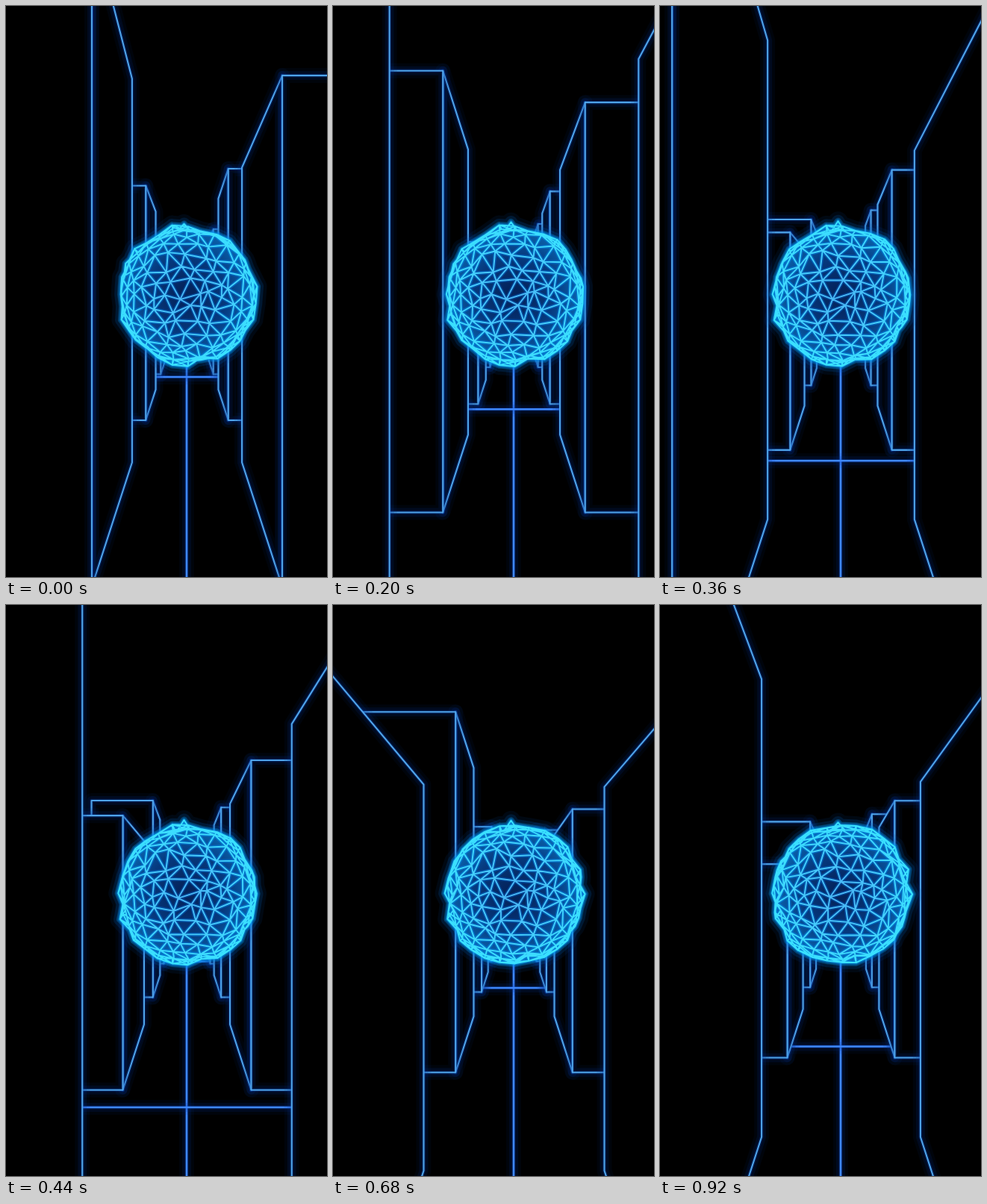
These frames come from a looping animation (430 px wide and 765 px high, 0.96 s). An HTML page with a canvas:

```html
<!DOCTYPE html>
<html>
<head>
<meta charset="utf-8">
<style>
html, body { margin: 0; width: 430px; height: 765px; overflow: hidden; background: #000; }
canvas { display: block; }
</style>
</head>
<body>
<canvas id="stage" width="430" height="765"></canvas>
<script>
const ctx = document.getElementById('stage').getContext('2d');
const LOOP = 960, STEP = 40;
const VX = 242.5, VY = 384.5;            // vanishing point
const GROUND = 3.085, OUTER = 2.8;       // in half street widths
const SPEED = 0.03798, NEAR = 0.8;
const BLOCK = 10.25, DEPTH = 5.75, FIRST = 7.84;
const LINE_GAP = 22.45, FIRST_LINE = 27.4;

// Towers rise and sink on one wave: [mean height, time of peak in s].
// A tower without a peak stands still.
const PERIOD = 1.1;
const left = { swing: 0.5, towers: [[3.9], [2.97, 0.42], [1.19], [2.58, 0.68], [0.52], [2.6, 0.52]] };
const right = { swing: 0.85, towers: [[1.44, 0.02], [2.18, 0.035], [1.98, 0.18], [2.06, 0.255], [1.7, 0.095], [2, 0.76]] };

function height({ swing, towers }, k, t) {
  const [mean, peak] = towers[k];
  if (peak === undefined) return mean;
  return mean + swing * Math.cos(2 * Math.PI * (t / 1000 - peak) / PERIOD);
}

const project = (x, y, d) => [VX + x * 1000 / d, VY + y * 1000 / d];

function trace(points, close) {
  ctx.beginPath();
  points.forEach(p => ctx.lineTo(p[0], p[1]));
  if (close) ctx.closePath();
}

function strokes(layers) {
  for (const [width, color] of layers) {
    ctx.lineWidth = width;
    ctx.strokeStyle = color;
    ctx.stroke();
  }
}

function neon(color = '#4fa4ea', width = 2.1) {
  strokes([[20, 'rgba(0,40,110,.1)'], [12, 'rgba(0,50,150,.15)'],
           [5, 'rgba(0,70,200,.25)'], [width, color]]);
}

function panel(points) {
  trace(points, true);
  ctx.fillStyle = '#000';
  ctx.fill();
  neon();
}

function building(side, inner, outer, h, front) {
  const back = front + DEPTH;
  if (back < NEAR) return;
  const near = Math.max(front, NEAR), a = side * inner, b = side * outer;
  panel([project(a, -h, near), project(a, -h, back), project(a, GROUND, back), project(a, GROUND, near)]);
  if (front > NEAR)
    panel([project(a, -h, front), project(b, -h, front), project(b, GROUND, front), project(a, GROUND, front)]);
}

function street(t) {
  trace([[VX - 0.5, VY], [VX - 0.5, 780]]);
  neon('#3f88ff', 2.6);
  const items = [];
  for (let i = 0; i < 3; i++) {
    const d = FIRST_LINE + i * LINE_GAP - SPEED * t;
    if (d > NEAR) items.push([d, () => {
      trace([project(-OUTER, GROUND, d), project(OUTER, GROUND, d)]);
      neon('#3f88ff', 2.5);
    }]);
  }
  left.towers.forEach((_, k) => {
    const front = FIRST + BLOCK * k - SPEED * t;
    items.push([front, () => {
      if (k === 2) building(-1, 2.9, 4.7, 1.93, front);   // a second row behind the low tower
      building(-1, 1, OUTER, height(left, k, t), front);
      building(1, 1, OUTER, height(right, k, t), front);
    }]);
  });
  items.sort((a, b) => b[0] - a[0]).forEach(item => item[1]());
}

// Icosahedron with every face split into a 5-step triangle grid.
const SPLIT = 5;
function makeBall() {
  const g = (1 + Math.sqrt(5)) / 2, v = [], tris = [];
  for (const a of [-1, 1]) for (const b of [-g, g]) v.push([a, b, 0], [0, a, b], [b, 0, a]);
  const touch = (i, j) => Math.hypot(...v[i].map((c, n) => c - v[j][n])) < 2.1;
  const point = (p, q, r, i, j) => {
    const w = p.map((c, n) => c * (SPLIT - i - j) + q[n] * i + r[n] * j);
    const len = Math.hypot(...w), [x, y, z] = w.map(c => c / len);
    return [y, x, z];                    // lays the facing edge horizontal
  };
  for (let a = 0; a < 12; a++) for (let b = a + 1; b < 12; b++) for (let c = b + 1; c < 12; c++) {
    if (!touch(a, b) || !touch(b, c) || !touch(a, c)) continue;
    const at = (i, j) => point(v[a], v[b], v[c], i, j);
    for (let i = 0; i < SPLIT; i++) for (let j = 0; i + j < SPLIT; j++) {
      tris.push([at(i, j), at(i + 1, j), at(i, j + 1)]);
      if (i + j < SPLIT - 1) tris.push([at(i + 1, j), at(i + 1, j + 1), at(i, j + 1)]);
    }
  }
  return tris;
}
const ball = makeBall().filter(([a, b, c]) => a[2] + b[2] + c[2] > -0.5);

// Pushes a vertex in or out and a little sideways, drifting slowly.
function bump([x, y, z], t) {
  const w = t * 0.002;
  const r = 91 * (1 + 0.035 * Math.sin(37 * x + 29 * y - 23 * z + w)
    + 0.025 * Math.sin(13 * y - 11 * x + 9 * z - w));
  const sx = 0.065 * Math.sin(41 * y + 37 * z + 19 * x + w * 0.5);
  const sy = 0.065 * Math.sin(43 * x - 31 * z + 17 * y - w * 0.5);
  return [VX + 0.5 + r * (x + sx * z), 387.5 + r * (y + sy * z)];
}

function radial(...stops) {
  const grad = ctx.createRadialGradient(VX, 387, 10, VX, 387, 96);
  stops.forEach((c, i) => grad.addColorStop(i / (stops.length - 1), c));
  return grad;
}

function sphere(t) {
  ctx.beginPath();
  for (const tri of ball) {
    const [a, b, c] = tri.map(p => bump(p, t));
    // same winding everywhere, so overlaps stay filled
    const flip = (b[0] - a[0]) * (c[1] - a[1]) < (b[1] - a[1]) * (c[0] - a[0]);
    for (const [i, p] of (flip ? [a, c, b] : [a, b, c]).entries())
      ctx[i ? 'lineTo' : 'moveTo'](p[0], p[1]);
    ctx.closePath();
  }
  // spike at the top
  ctx.moveTo(230, 301);
  ctx.lineTo(238.5, 292 - 4 * Math.sin(Math.PI * t / LOOP));
  ctx.lineTo(247, 301);
  ctx.closePath();

  strokes([[26, 'rgba(0,70,150,.12)'], [17, 'rgba(0,100,200,.18)'], [9, 'rgba(0,150,240,.35)']]);
  ctx.fillStyle = radial('#04245c', '#06397e', '#0b6cb8');
  ctx.fill();
  strokes([[5, radial('rgba(0,110,230,.35)', 'rgba(0,150,245,.5)')],
           [1.9, radial('#48b8f6', '#46cbfc', '#38e2ff')]]);
}

function draw(now) {
  const t = Math.floor((now % LOOP) / STEP) * STEP;
  ctx.fillStyle = '#000';
  ctx.fillRect(0, 0, 430, 765);
  ctx.lineJoin = 'round';
  street(t);
  sphere(t);
  requestAnimationFrame(draw);
}
draw(performance.now());
</script>
</body>
</html>
```
